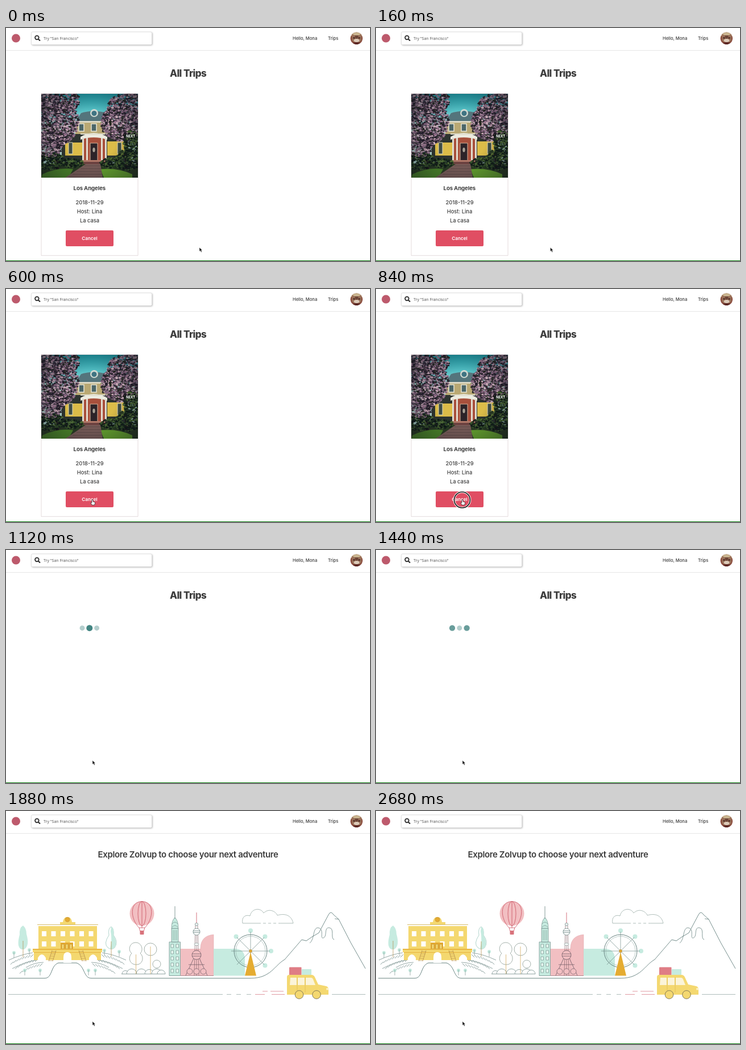
An HTML page with a canvas for the animation above (2720 ms loop, 640 px wide and 411 px high).

```html
<!DOCTYPE html>
<html lang="en">
<head>
<meta charset="utf-8">
<title>All Trips</title>
<style>
  html, body { margin: 0; width: 100%; height: 100%; overflow: hidden; background: #fff; }
  canvas { display: block; width: 640px; height: 411px; }
</style>
</head>
<body>
<canvas id="stage"></canvas>
<script>
const WIDTH = 640, HEIGHT = 411, LOOP = 2720, STEP = 40;
const ARRIVE = 594, CLICK = 760, LOADING = 880, HOME = 1720;
const TAU = Math.PI * 2;
const INTER = 'Inter, sans-serif', OPEN = '"Open Sans", sans-serif';
const MINT = '#c6ebe0', YELLOW = '#f4d870', ORANGE = '#e5ac32', PINK = '#f2bfc2',
      RED = '#c9505f', SLATE = '#66827f', INK = '#3c3c3c';

const scale = window.devicePixelRatio || 1;
const stage = document.getElementById('stage');
stage.width = WIDTH * scale;
stage.height = HEIGHT * scale;
const screen2d = stage.getContext('2d');
let ctx = screen2d;

function paint(fill, stroke, width = 0.8) {
  if (fill) { ctx.fillStyle = fill; ctx.fill(); }
  if (stroke) { ctx.strokeStyle = stroke; ctx.lineWidth = width; ctx.stroke(); }
}
function rect(x, y, w, h, fill, stroke, width) {
  ctx.beginPath(); ctx.rect(x, y, w, h); paint(fill, stroke, width);
}
function rounded(x, y, w, h, r, fill, stroke, width) {
  ctx.beginPath(); ctx.roundRect(x, y, w, h, r); paint(fill, stroke, width);
}
function oval(x, y, rx, ry, fill, stroke, width) {
  ctx.beginPath(); ctx.ellipse(x, y, rx, ry, 0, 0, TAU); paint(fill, stroke, width);
}
function circle(x, y, r, fill, stroke, width) { oval(x, y, r, r, fill, stroke, width); }
function line(x1, y1, x2, y2, color = SLATE, width = 0.8) {
  ctx.beginPath(); ctx.moveTo(x1, y1); ctx.lineTo(x2, y2); paint(null, color, width);
}
function shape(d, fill, stroke, width = 0.8) {
  const path = new Path2D(d);
  if (fill) { ctx.fillStyle = fill; ctx.fill(path); }
  if (stroke) { ctx.strokeStyle = stroke; ctx.lineWidth = width; ctx.stroke(path); }
}
function text(str, x, y, size, { weight = 400, color = INK, align = 'center', family = INTER, track = 0 } = {}) {
  ctx.font = `${weight} ${size}px ${family}`;
  ctx.letterSpacing = `${track * size}px`;
  ctx.textAlign = align;
  ctx.fillStyle = color;
  ctx.fillText(str, x, y);
}
function layer(draw) {
  const canvas = document.createElement('canvas');
  canvas.width = stage.width;
  canvas.height = stage.height;
  ctx = canvas.getContext('2d');
  ctx.scale(scale, scale);
  draw();
  ctx = screen2d;
  return canvas;
}
function seeded(seed) {
  return () => (seed = (seed * 16807) % 2147483647) / 2147483647;
}

function drawHeader() {
  rect(0, 0, WIDTH, HEIGHT, '#fff');
  rect(0, 39, WIDTH, 1, '#e5e5e5');
  rect(0, 410, WIDTH, 1, '#067a0a');
  circle(17.5, 18, 7.5, '#bd5a6c');

  ctx.save();
  ctx.shadowColor = 'rgba(0,0,0,.32)';
  ctx.shadowBlur = 3 * scale;
  ctx.shadowOffsetX = scale;
  ctx.shadowOffsetY = scale;
  rounded(44.5, 7, 212, 22.5, 2, '#fff');
  ctx.restore();
  rounded(44.5, 7, 212, 22.5, 2, null, '#d6d6d6', 0.7);
  circle(54.4, 17, 3.3, null, '#2b2b2b', 1.8);
  line(57, 19.7, 60, 22.6, '#2b2b2b', 2.1);
  text('Try "San Francisco"', 66, 20.7, 7, { align: 'left', family: OPEN, color: '#505050' });
  text('Hello, Mona', 504, 20.6, 7.6, { align: 'left', weight: 500 });
  text('Trips', 566, 20.6, 7.6, { align: 'left', weight: 500 });

  ctx.save();
  ctx.beginPath(); ctx.arc(616.3, 18.3, 10.7, 0, TAU); ctx.clip();
  rect(605, 7, 23, 23, '#8a4a3c');
  rect(605, 7, 23, 7, '#c9b48f');
  shape('M608 21V10L613 13H620L625 10V21Q623 26 616.5 26T608 21Z', '#9a7058');
  shape('M613 13H620L618 19H615Z', '#6d4638');
  oval(612, 17.5, 2, 1.3, '#4a2c26');
  oval(621, 17.5, 2, 1.3, '#4a2c26');
  oval(616.5, 22, 5, 3, '#dccbb9');
  oval(616.5, 29, 9, 4, '#5c2723');
  ctx.restore();
}

function foliage(random, cx, cy, rx, ry, count, colors) {
  for (let i = 0; i < count; i++) {
    const angle = random() * TAU, reach = Math.sqrt(random());
    const size = 0.7 + random() * 1.7;
    oval(cx + Math.cos(angle) * rx * reach, cy + Math.sin(angle) * ry * reach,
      size, size * 0.75, colors[Math.floor(random() * colors.length)]);
  }
}

function drawHouse() {
  shape('M118 172L132 150Q154 143 178 150L192 172Z', '#54757c');
  circle(155, 150, 7, '#cfd9d2');
  circle(155, 150.5, 4.5, '#3f7382');
  rect(122, 165, 66, 24, '#b9a873');
  rect(118, 164, 74, 3, '#dcd9c5');
  for (const x of [128, 150, 172]) rect(x, 169, 9, 13, '#4c6668', '#e8e6d7', 1.5);
  rect(98, 187, 112, 48, '#2d3430');
  rect(104, 202, 30, 23, '#dcbc49');
  rect(178, 200, 30, 25, '#dcbc49');
  for (const x of [110, 196]) rect(x, 202, 7, 20, '#3f4d45', '#ddd8bd', 1);
  rect(134, 193, 42, 42, '#a8503c');
  rect(148, 203, 13, 31, '#2c2429', '#d9b59a', 1);
  oval(154.5, 215, 2.2, 4, '#a9a396');
  shape('M131 192Q154 178 178 192V197Q154 189 131 197Z', '#ecebe0');
  line(131, 187, 178, 187, '#dedccb', 2);
  for (const x of [134, 141, 167, 174]) rect(x, 194, 3, 40, '#e0ddd0');
  rect(132, 233, 46, 3, '#b07868');
  rect(128, 236, 52, 5, '#6e4341');
}

function drawPhoto() {
  const random = seeded(71);
  const blossom = ['#1f1b27', '#342a39', '#50404f', '#82657e', '#b391a5', '#926c88', '#2b2430', '#d2b3bf', '#24291f'];
  const shrubs = ['#0f1c18', '#182a1e', '#35512a', '#101616', '#4f6b35'];
  ctx.save();
  ctx.beginPath(); ctx.rect(62, 116, 170, 148); ctx.clip();
  const sky = ctx.createLinearGradient(0, 116, 0, 175);
  sky.addColorStop(0, '#1e9aa6');
  sky.addColorStop(0.5, '#55bfc4');
  sky.addColorStop(1, '#b4d9d2');
  rect(62, 116, 170, 148, sky);
  drawHouse();

  rect(62, 240, 170, 24, '#2b3c23');
  shape('M64 258Q92 245 118 249L110 264H62Z', '#4f8a2a');
  shape('M166 249Q198 246 222 258V264H172Z', '#68a62f');
  shape('M140 240H166L170 264H104Z', '#7d5f5b');
  for (let i = 0; i < 5; i++) line(138 - i * 7, 243 + i * 5, 166 + i, 243 + i * 5, '#604a48', 1);
  shape('M84 249L88 192L70 160L93 187L108 157L96 194L93 249Z', '#231c1f');
  shape('M209 249L208 198L186 165L209 184L226 157L214 193L217 249Z', '#231c1f');

  foliage(random, 78, 234, 25, 16, 420, shrubs);
  foliage(random, 214, 233, 22, 19, 420, shrubs);
  foliage(random, 116, 238, 20, 8, 230, shrubs);
  foliage(random, 186, 238, 20, 9, 230, shrubs);
  foliage(random, 84, 165, 44, 44, 2200, blossom);
  foliage(random, 82, 128, 48, 24, 1100, blossom);
  foliage(random, 205, 168, 38, 32, 1500, blossom);
  foliage(random, 216, 140, 38, 25, 1100, blossom);
  foliage(random, 76, 204, 24, 24, 520, blossom);
  foliage(random, 221, 204, 14, 25, 350, shrubs);
  const shade = ctx.createRadialGradient(150, 190, 45, 147, 190, 118);
  shade.addColorStop(0, 'rgba(10,15,22,0)');
  shade.addColorStop(1, 'rgba(10,15,22,.5)');
  rect(62, 116, 170, 148, shade);
  text('PREV', 67, 192.5, 5.8, { weight: 600, color: 'rgba(255,255,255,.28)', align: 'left' });
  text('NEXT', 211, 192.5, 5.9, { weight: 700, color: '#fff', align: 'left' });
  ctx.restore();
}

function drawTrips() {
  drawHeader();
  text('All Trips', 320, 85.7, 17, { weight: 800, track: -0.035 });
}

function drawCard() {
  drawTrips();
  rect(62, 115.7, 170, 285.6, '#fff', '#ddd2d3', 0.8);
  drawPhoto();
  text('Los Angeles', 146.8, 285.6, 9.6, { weight: 700, track: -0.01 });
  ['2018-11-29', 'Host: Lina', 'La casa'].forEach((row, i) => {
    text(row, 147, 311.4 + i * 16, 9.3, { weight: 500 });
  });
  rounded(105, 357, 84, 28, 2, '#e04e63');
  text('Cancel', 147, 374.2, 8.2, { weight: 600, color: '#fff' });
}

function sprout(x, y, stem = 9) {
  circle(x, y, 3, MINT);
  line(x, y - 1, x, y + stem, SLATE, 0.6);
}

function drawFields() {
  // Mirrored vineyard rows flank the villa.
  for (const side of [-1, 1]) {
    ctx.save();
    ctx.translate(108, 0);
    ctx.scale(side, 1);
    shape('M61 250Q82 253 103 263M55 263Q75 266 97 278M42 267Q58 267 73 276', null, SLATE, 0.7);
    for (let row = 0; row < 3; row++) {
      for (let i = 0; i < 8; i++) {
        const x = 60 - row * 8 + i * 5, y = 253 + row * 8 + i * i * 0.16 + i * 0.7;
        line(x, y, x + 5, y + 5, SLATE, 0.8);
      }
    }
    ctx.restore();
  }
  for (const [x, y] of [[14, 250], [41, 245], [33, 281], [60, 281], [145, 281], [157, 281], [173, 246], [199, 248]]) sprout(x, y);
  shape('M4 295H68C82 295 78 273 92 268H124C139 273 136 295 150 295H430', null, SLATE, 1);
  shape('M30 202Q36 207 36 217Q42 238 32 244H27Q18 240 24 218Q23 206 30 202Z', MINT);
  line(30, 229, 30, 258, '#b79558');
  shape('M185 204Q190 207 189 219Q198 231 191 241Q186 246 179 241Q171 234 181 219Q179 207 185 204Z', '#fff', '#9ec9bf');
  shape('M184 212Q187 228 183 243H188Q198 236 189 219Q190 206 185 204Z', MINT);
  line(185, 230, 185, 257, '#b79558');
}

function drawVilla() {
  rect(57, 203, 103, 42, YELLOW);
  line(55, 200.5, 162, 200.5, '#d7bd6d', 1);
  shape('M95 200V196H100Q101 187 108 187T116 196H122V200Z', YELLOW);
  circle(108, 191.5, 4, ORANGE, '#bd8839', 0.6);
  for (let i = 0; i < 6; i++) {
    for (const y of [212, 230]) rect(63 + i * 16.5, y, 8, 9, '#fff');
  }
  rect(96, 232, 22, 11, ORANGE);
  for (const x of [100, 107, 114]) rect(x - 2, 235, 4, 8, YELLOW, '#a97b32', 0.5);
  rect(47, 243, 122, 6, YELLOW);
  rect(49, 249, 118, 14, YELLOW);
  line(47, 244, 169, 244, ORANGE, 1.5);
  line(49, 249.5, 167, 249.5, ORANGE);
  shape('M101 268V258Q101 249 108 249T115 258V268Z', '#fff');
  for (const x of [63, 153]) shape(`M${x - 7} 265V259Q${x} 247 ${x + 7} 259V265Z`, '#fff');
  for (const side of [-1, 1]) {
    const top = 108 + side * 20, foot = 108 + side * 26;
    line(top, 246, foot, 265, '#b78c48');
    line(top + 7 * side, 246, foot + 7 * side, 265, '#b78c48');
    for (let i = 0; i < 5; i++) {
      const x = top + side * i * 1.4;
      line(x, 248 + i * 4, x + side * 7, 248 + i * 4, '#b78c48', 0.6);
    }
  }
}

function drawBalloon() {
  circle(239, 181, 21.5, PINK);
  oval(239, 181, 7, 21.5, null, RED);
  shape('M239 159.5C216 160 219 191 234 206H244C259 191 262 160 239 159.5M239 160V206M234 206L236 212M244 206L242 212', null, RED, 0.8);
  rounded(235.5, 211, 7, 7, 1, '#d8727b');
}

function drawPark() {
  for (const [x, r] of [[210, 6], [221, 9], [238, 9], [252, 8], [265, 9], [273, 7]]) {
    ctx.beginPath(); ctx.arc(x, 287.5, r, Math.PI, TAU); paint('#fff', SLATE, 0.7);
  }
  shape('M221 251C214 246 217 232 228 232S242 246 236 251C243 257 241 271 229 271S214 258 221 251Z', '#fff', '#8b9b94');
  circle(254, 244, 11, '#fff', '#8b9b94');
  circle(265, 270, 7, '#fff', '#8b9b94');
  line(228.5, 253, 228.5, 288, '#d4ad63');
  line(254, 239, 254, 288, '#d4ad63');
  line(203, 287.5, 280, 287.5, SLATE, 0.7);
}

function drawCity() {
  rect(307, 243, 36, 47.5, PINK);
  shape('M342 290.5V241Q343 220 365 218V290.5Z', PINK, '#dfa5aa', 0.5);
  shape('M365 290.5V243H402Q420 243 420 261V290.5Z', MINT);
  rect(287, 231, 19.5, 59.5, MINT, SLATE, 0.7);
  rect(291, 207, 12, 24, MINT, SLATE, 0.7);
  shape('M291 207Q291 193 297 188Q303 193 303 207Z', MINT, SLATE, 0.6);
  line(297, 168, 297, 190);
  for (const y of [196, 202]) shape(`M292 ${y + 3}Q297 ${y - 3} 302 ${y + 3}`, null, SLATE, 0.6);
  for (const x of [294, 297, 300]) line(x, 210, x, 228, SLATE, 0.6);
  for (let row = 0; row < 5; row++) {
    for (const x of [290, 299]) rect(x, 235 + row * 11, 4.5, 6, '#e5f6ef', SLATE, 0.6);
  }

  line(335, 179, 335, 200, RED);
  shape('M333 202L331 290M337 202L339 290M335 208V290', null, '#87656b', 0.7);
  circle(335, 200, 2.5, '#fff', SLATE);
  circle(335, 213, 6, '#fff', SLATE);
  line(329, 211.5, 341, 211.5);
  line(329, 214.5, 341, 214.5);
  oval(335, 235, 4, 2, '#fff', SLATE, 0.6);
  circle(335, 254, 8, PINK, '#725e67');
  line(327, 252, 343, 252, '#725e67');
  line(327, 256, 343, 256, '#725e67');
  shape('M330 260L316 290M340 260L354 290M321 271H349', null, '#725e67');
  for (const x of [323, 335, 347]) circle(x, 283, 5, PINK, '#725e67', 0.7);
  line(307, 290.5, 365, 290.5, '#a27c82');
}

function drawWheel() {
  const cx = 430, cy = 247;
  for (let i = 0; i < 8; i++) {
    const a = i * TAU / 8;
    if (i !== 2) circle(cx + Math.cos(a) * 36, cy + Math.sin(a) * 36, 4, MINT);
    line(cx, cy, cx + Math.cos(a) * 34, cy + Math.sin(a) * 34, SLATE, 0.65);
  }
  circle(cx, cy, 29, null, SLATE, 1);
  circle(cx, cy, 26, null, '#91aaa4', 0.6);
  shape('M430 249L440 290.5H420Z', ORANGE);
  circle(cx, cy, 2.5, ORANGE, '#a57b35', 0.6);
}

function drawMountains() {
  shape('M430 295C466 295 472 272 490 262L520 227L528 229L538 222L550 215L567 183Q571 175 576 183L585 191L606 232L632 278', null, SLATE, 0.9);
  shape('M534 233C543 226 539 205 549 206C560 208 552 224 557 224C566 223 558 204 569 206C578 208 570 225 577 227', null, SLATE, 0.8);
  line(585, 191, 578, 190);
  shape('M443 198H416C414 188 420 182 429 185C432 171 448 170 453 180C463 170 475 178 477 184C491 180 502 184 505 198H482', null, '#9bada8', 0.8);
  ctx.setLineDash([5, 4]);
  line(443, 198, 482, 198, '#9bada8');
  ctx.setLineDash([]);
}

function drawCar() {
  rounded(498, 275.5, 21.5, 14, 1, '#df7d85');
  rounded(520, 279, 17, 10, 1, MINT);
  shape('M494 324V293Q494 289 498 289H537Q541 289 543 293L549 306L563 309Q567 310 567 315V324Z', YELLOW);
  shape('M500 294H511V307H499Z', '#fbf4d9');
  shape('M513 294H525V307H513Z', '#fbf4d9');
  shape('M527 294H536Q539 294 540 297L544 307H527Z', '#fbf4d9');
  line(512, 293, 512, 320, '#d9b84f', 0.6);
  line(526, 293, 526, 320, '#d9b84f', 0.6);
  circle(565, 314, 2, '#fff3c5');
  for (const x of [515.5, 546]) circle(x, 324, 7.3, YELLOW, '#776f55', 0.9);
  line(4, 323.5, 381, 323.5, '#9aada9');
  for (const x of [388, 405, 423]) line(x, 323.5, x + 8, 323.5, '#9aada9');
  for (const [x, y, w] of [[451, 318, 9], [465, 318, 23], [438, 323.5, 17], [467, 323.5, 23]]) line(x, y, x + w, y, '#d87f89');
  line(573, 323.5, 632, 323.5, '#9aada9');
}

function drawHome() {
  drawHeader();
  text('Explore Zolvup to choose your next adventure', 320, 81.8, 15, { weight: 600, track: -0.025 });
  for (const part of [drawFields, drawVilla, drawBalloon, drawPark, drawCity, drawWheel, drawMountains, drawCar]) part();
}

function drawLoader(elapsed) {
  const half = 320;
  [0, half, 0].forEach((delay, i) => {
    const phase = Math.max(0, elapsed - delay) / half % 2;
    const level = Math.abs(1 - phase);
    ctx.globalAlpha = 0.2 + 0.8 * level;
    circle(134 + i * 12.8, 137.7, 5.5 * (0.75 + 0.25 * level), '#438582');
  });
  ctx.globalAlpha = 1;
}

function drawPointer(t) {
  const p = Math.min(t / ARRIVE, 1), eased = p * p * (3 - 2 * p);
  const x = 340 - 188 * eased, y = 387 - 16 * eased ** 4;
  if (t >= CLICK && t < LOADING) {
    circle(151.5, 372, 14, null, '#fff', 3.6);
    circle(151.5, 372, 14, null, '#191919', 1.7);
  }
  ctx.save();
  ctx.translate(x, y);
  if (t < LOADING && x < 189) {
    shape('M-1 1Q0 -.3 1 1V4L4 5Q5 5 4.5 7L3.5 10H-1L-3 6Q-2.5 5 -1 6Z', '#fff', '#222', 0.7);
  } else {
    shape('M0 0V7.2L1.7 5.7L3 8.6L4.4 8L3.1 5.2H5.2Z', '#111', '#fff', 0.5);
  }
  ctx.restore();
}

const card = layer(drawCard), trips = layer(drawTrips), home = layer(drawHome);

function render() {
  const t = Math.floor(performance.now() % LOOP / STEP) * STEP;
  ctx.setTransform(1, 0, 0, 1, 0, 0);
  ctx.drawImage(t < LOADING ? card : t < HOME ? trips : home, 0, 0);
  ctx.scale(scale, scale);
  if (t >= LOADING && t < HOME) drawLoader(t - LOADING);
  drawPointer(t);
  requestAnimationFrame(render);
}
render();
</script>
</body>
</html>
```
